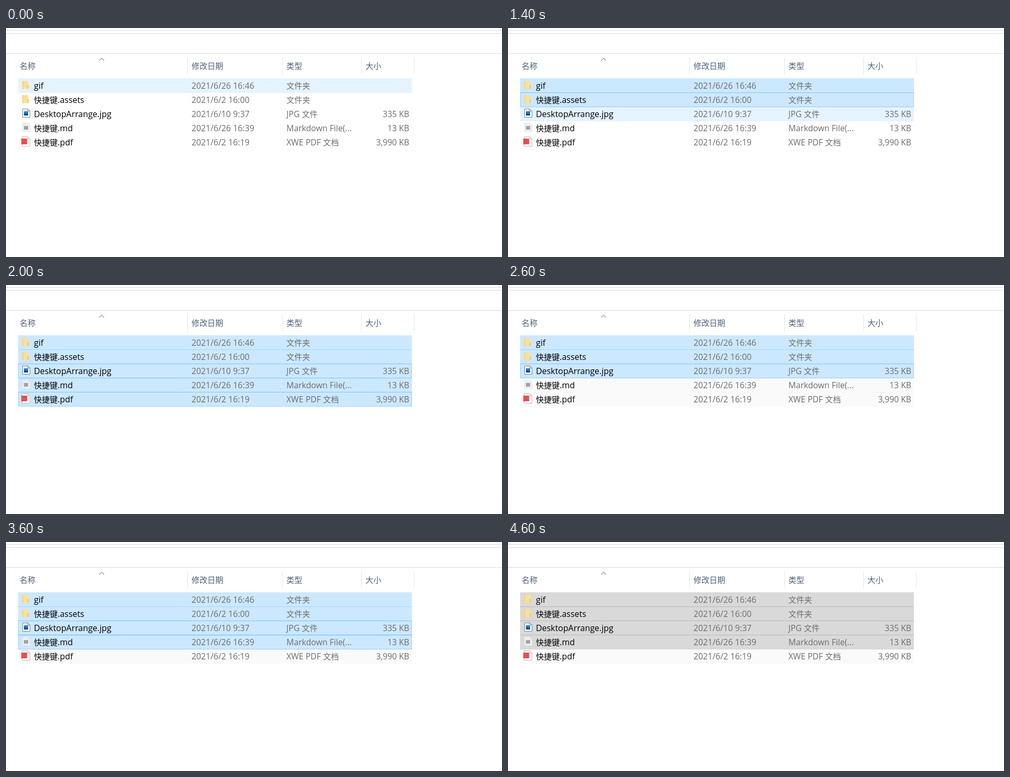
Write an HTML page that moves like this. It is 941 px wide and 437 px high and loops after 4800 ms.

```html
<!DOCTYPE html>
<html lang="zh">
<head>
<meta charset="utf-8">
<title>文件列表</title>
<style>
  html, body { margin: 0; width: 100%; height: 100%; overflow: hidden; background: #fff; }
  svg { display: block; width: 941px; height: 437px; }
  text { font-family: "Open Sans", "Noto Sans", "Noto Sans CJK SC", "Noto Sans CJK", sans-serif; white-space: pre; }
  .cjk { font-family: "Noto Sans CJK SC", "Noto Sans CJK", sans-serif; font-size: 15px; }
  rect { shape-rendering: crispEdges; }
</style>
</head>
<body>
<svg id="stage" viewBox="0 0 941 437"></svg>
<script>
const NS = "http://www.w3.org/2000/svg";
const stage = document.getElementById("stage");

function add(parent, tag, attrs = {}) {
  const node = document.createElementNS(NS, tag);
  for (const key in attrs) node.setAttribute(key, attrs[key]);
  return parent.appendChild(node);
}

const box = (parent, x, y, width, height, fill) =>
  add(parent, "rect", { x, y, width, height, fill });
const shape = (parent, d, fill, stroke = "none") =>
  add(parent, "path", { d, fill, stroke });

// Chinese runs are set slightly smaller than Latin ones.
function label(x, y, str, size, fill, anchor = "start") {
  const text = add(stage, "text", { x, y, fill, "font-size": size, "text-anchor": anchor });
  for (const run of str.match(/[\u4e00-\u9fff]+|[^\u4e00-\u9fff]+/g) || []) {
    const span = add(text, "tspan", /[\u4e00-\u9fff]/.test(run) ? { class: "cjk" } : {});
    span.textContent = run;
  }
}

// Window frame and column header
for (const y of [4, 10, 48]) box(stage, 0, y, 941, 1, "#dadada");
box(stage, 2, 49, 1, 383, "#f7f7f7");
for (const x of [344, 524, 674, 774]) box(stage, x, 56, 1, 32, "#e5e5e5");
shape(stage, "M177 62L181.5 57.5L186 62", "none", "#555");
[[26, "名称"], [352, "修改日期"], [532, "类型"], [682, "大小"]]
  .forEach(([x, str]) => label(x, 78, str, 15, "#4c607a"));

// File rows
const TOP = 96, STEP = 27, LEFT = 23, WIDTH = 747, HEIGHT = 28;

const icons = {
  folder(g) {
    box(g, 31, 5, 11, 15, "#ffe08f");
    box(g, 31, 5, 2, 16, "#f8d477");
    box(g, 41, 13, 2, 7, "#eec561");
  },
  page(g, fill, stroke) {
    shape(g, "M31.5 4.5H41.5L45.5 8.5V20.5H31.5Z", fill, stroke);
    shape(g, "M41.5 4.5V8.5H45.5", "none", stroke);
  },
  image(g) {
    icons.page(g, "#fff", "#7d8186");
    box(g, 34, 9, 8, 8, "#1f7fd4");
    shape(g, "M34 17V14.5L36.5 12.5L39 14.5L42 13.5V17Z", "#0c4687");
  },
  note(g) {
    icons.page(g, "#f0f0f0", "#e6e6e6");
    box(g, 34, 10, 8, 7, "#a4a4a4");
  },
  doc(g) {
    shape(g, "M30.5 3.5H41.5L45.5 7.5V21.5H30.5Z", "#fff", "#b9b9b9");
    shape(g, "M41.5 3.5V7.5H45.5", "none", "#b9b9b9");
    box(g, 29, 7, 11, 11, "#e8504f");
  }
};

const files = [
  ["folder", "gif", "2021/6/26 16:46", "文件夹", ""],
  ["folder", "快捷键.assets", "2021/6/2 16:00", "文件夹", ""],
  ["image", "DesktopArrange.jpg", "2021/6/10 9:37", "JPG 文件", "335 KB"],
  ["note", "快捷键.md", "2021/6/26 16:39", "Markdown File(...", "13 KB"],
  ["doc", "快捷键.pdf", "2021/6/2 16:19", "XWE PDF 文档", "3,990 KB"]
];

const rows = files.map((_, i) => {
  const y = TOP + STEP * i;
  return {
    fill: box(stage, LEFT, y, WIDTH, HEIGHT, "none"),
    edge: add(stage, "rect", {
      x: LEFT + 0.5, y: y + 0.5, width: WIDTH - 1, height: HEIGHT - 1, fill: "none"
    })
  };
});

files.forEach(([icon, name, date, type, size], i) => {
  const y = TOP + STEP * i, base = y + 20;
  icons[icon](add(stage, "g", { transform: `translate(0 ${y})` }));
  label(53, base, name, 15.9, "#000");
  label(352, base, date, 15.75, "#6d6d6d");
  label(532, base, type, 15.7, "#6d6d6d");
  label(765, base, size, 15.5, "#6d6d6d", "end");
});

// [start ms, selected rows from the top, row under the pointer]
const LOOP = 4800, SHRINK = 2400, BLUR = 4600;
const steps = [
  [0, 0, 0], [400, 1, 1], [600, 1, 2], [1400, 2, 2], [1600, 3, 2],
  [1800, 4, 2], [2000, 5, 2], [2400, 4, 2], [2600, 3, 2], [3000, 4, 2],
  [3200, 3, 2], [3600, 4, 2], [4000, 4, 0], [4200, 4, -1], [4600, 4, -1]
];
const tint = alpha => `rgba(0,140,255,${alpha})`;

function draw(time) {
  const [, count, pointer] = steps.filter(step => step[0] <= time).pop();
  const blurred = time >= BLUR;
  rows.forEach(({ fill, edge }, i) => {
    const chosen = i < count;
    const framed = chosen && !blurred && (i === count - 1 || i === pointer);
    const color = chosen ? (blurred ? "rgba(0,0,0,.15)" : tint(0.2))
      : i === pointer ? tint(0.1)
      : time >= SHRINK && i > 2 ? "rgba(0,0,0,.02)" : "none";
    const inset = framed ? 1 : 0;
    fill.setAttribute("fill", color);
    fill.setAttribute("x", LEFT + inset);
    fill.setAttribute("y", TOP + STEP * i + inset);
    fill.setAttribute("width", WIDTH - 2 * inset);
    fill.setAttribute("height", HEIGHT - 2 * inset);
    edge.setAttribute("stroke", framed ? tint(0.4) : "none");
  });
}

const start = performance.now();
function tick() {
  draw((performance.now() - start) % LOOP);
  requestAnimationFrame(tick);
}
tick();
</script>
</body>
</html>
```
